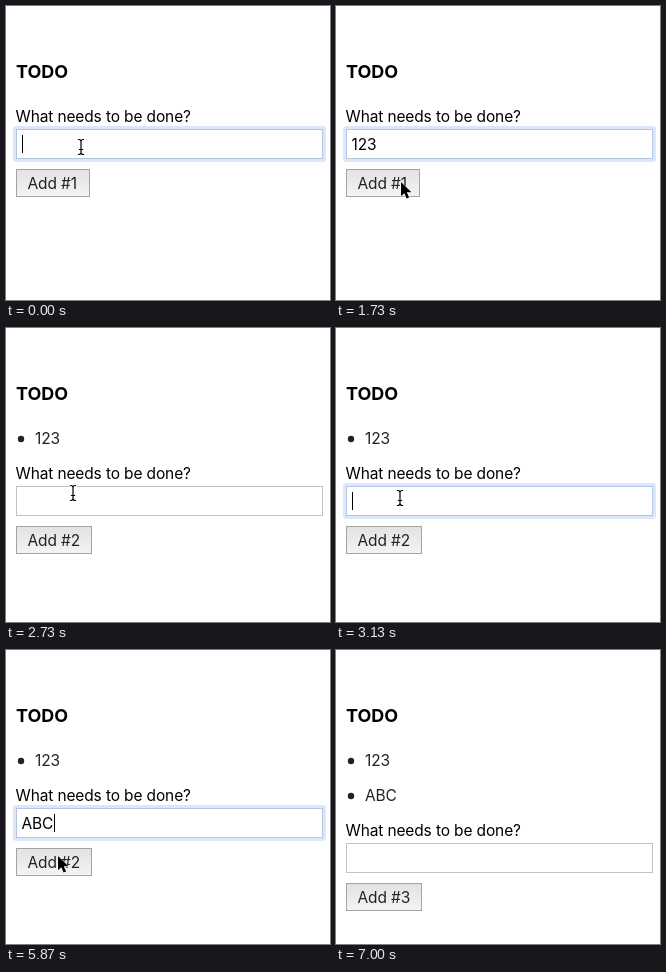
Recreate the animation shown at these times as an HTML page. Size 324x294 px, loop 8.07 s.

```html
<!DOCTYPE html>
<html lang="en">
<head>
<meta charset="utf-8">
<title>TODO</title>
<style>
  html, body { margin: 0; width: 100%; height: 100%; overflow: hidden; background: #fff; }
  svg { display: block; }
  text { font: 15.5px Inter, Roboto, sans-serif; letter-spacing: -.13px; white-space: pre; }
  h1, .title { font-size: 18px; font-weight: 700; letter-spacing: 0; }
  .soft { fill: #222; }
</style>
</head>
<body>
<svg width="324" height="294" viewBox="0 0 324 294">
  <defs>
    <linearGradient id="shade" x2="0" y2="1">
      <stop stop-color="#e2e2e2"/><stop offset="1" stop-color="#f4f4f4"/>
    </linearGradient>
  </defs>
  <text class="title" x="10" y="72">TODO</text>
  <g class="item soft"><circle cx="15" cy="111" r="3.2"/><text x="29" y="116">123</text></g>
  <g class="item soft"><circle cx="15" cy="146" r="3.2"/><text x="29" y="151">ABC</text></g>
  <g id="form">
    <text x="9.5" y="116">What needs to be done?</text>
    <rect id="ring" x="7" y="120" width="313" height="36" rx="3" fill="#dce7fa"/>
    <rect x="10.5" y="123.5" width="306" height="29" fill="#fff" stroke="#c2c2c2"/>
    <rect id="edge" x="10.5" y="123.5" width="306" height="29" fill="none" stroke="#b3c6e6"/>
    <text id="value" x="15.5" y="144"></text>
    <rect id="caret" y="129" width="1" height="18"/>
    <rect id="button" x="10.5" y="163.5" height="27" fill="url(#shade)" stroke="#a3a3a3"/>
    <text id="label" class="soft" x="21.5" y="183"></text>
  </g>
  <path id="arrow" d="M0 0V14.3L3.3 11.2 5.6 16.6 8.1 15.5 5.8 10.3H10.4Z" stroke="#fff" stroke-width="1" stroke-linejoin="round" paint-order="stroke"/>
  <g id="beam" fill="none" stroke-linecap="square">
    <path d="M-2.5-7.5Q0-7.5 0-5.5Q0-7.5 2.5-7.5M0-5.5V5.5M-2.5 7.5Q0 7.5 0 5.5Q0 7.5 2.5 7.5M-1.5 2.5H1.5" stroke="#fff" stroke-width="2.6" opacity=".8"/>
    <path d="M-2.5-7.5Q0-7.5 0-5.5Q0-7.5 2.5-7.5M0-5.5V5.5M-2.5 7.5Q0 7.5 0 5.5Q0 7.5 2.5 7.5M-1.5 2.5H1.5" stroke="#000" stroke-width="1.2"/>
  </g>
</svg>
<script>
const LOOP = 8070;
const $ = id => document.getElementById(id);
const items = document.querySelectorAll('.item');

// Every track lists [start time, ...values]; the latest entry holds.
const typing = [[0, '', 16], [670, '1', 23], [800, '12', 33], [1200, '123', 42],
  [2070, '', 16], [3870, 'A', 26], [4330, 'AB', 37], [4670, 'ABC', 48], [6130, '', 16]];
const blink = [[0, 1], [200, 0], [670, 1], [1730, 0], [3000, 1], [3530, 0],
  [3870, 1], [5200, 0], [5730, 1], [6000, 0]];
const focus = [[0, 1], [1930, .67], [2000, .33], [2070, 0], [3000, .33], [3070, .67],
  [3130, 1], [6000, .67], [6070, .33], [6130, 0]];
const count = [[0, 0], [2070, 1], [6130, 2]];
const pointer = [[0, 'beam', 75, 141], [670, ''],
  [1470, 'beam', 76, 142], [1530, 'beam', 76, 147], [1600, 'arrow', 71, 159],
  [1670, 'arrow', 67, 171], [1730, 'arrow', 65, 176],
  [2330, 'beam', 72, 170], [2400, 'beam', 78, 165],
  [2600, 'beam', 76, 161], [2670, 'beam', 71, 160], [2730, 'beam', 67, 165], [2800, 'beam', 64, 170],
  [3870, ''],
  [5530, 'beam', 64, 171], [5600, 'beam', 62, 178], [5670, 'arrow', 57, 191],
  [5730, 'arrow', 54, 199], [5800, 'arrow', 52, 204], [5870, 'arrow', 52, 206],
  [6730, 'beam', 50, 200], [6800, 'beam', 46, 178], [6870, 'arrow', 40, 122],
  [6930, 'beam', 35, 65], [7000, '']];

const at = (track, t) => track.findLast(entry => entry[0] <= t).slice(1);
const set = (id, attrs) => {
  for (const key in attrs) $(id).setAttribute(key, attrs[key]);
};
const write = (id, text) => {
  if ($(id).textContent !== text) $(id).textContent = text;
};

function draw(t) {
  const [value, caretX] = at(typing, t);
  const [glow] = at(focus, t);
  const [done] = at(count, t);
  const [shape, x, y] = at(pointer, t);

  items.forEach((item, i) => item.setAttribute('opacity', +(i < done)));
  set('form', { transform: `translate(0 ${35 * done})` });
  set('ring', { opacity: glow });
  set('edge', { opacity: glow });
  set('caret', { x: caretX, opacity: at(blink, t)[0] });
  set('button', { width: done ? 75 : 73 });
  write('value', value);
  write('label', `Add #${done + 1}`);
  for (const id of ['arrow', 'beam']) {
    set(id, { opacity: +(id === shape), transform: `translate(${x ?? 0} ${y ?? 0})` });
  }
}

function tick() {
  draw(performance.now() % LOOP);
  requestAnimationFrame(tick);
}
tick();
</script>
</body>
</html>
```
